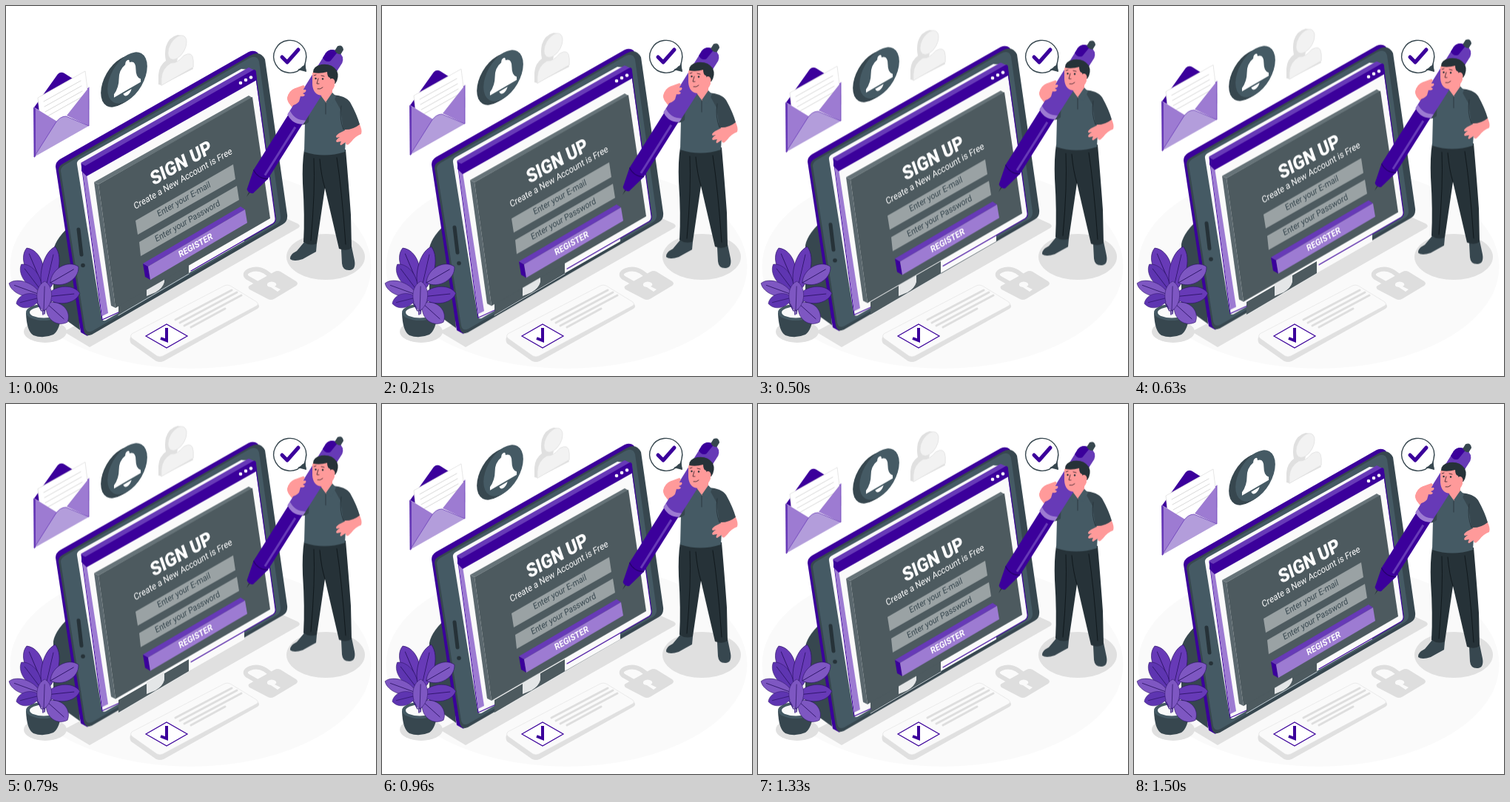
An HTML page that plays this animation: 500x500 px, repeating every 1540 ms.

```html
<!DOCTYPE html>
<html lang="en">
<head>
<meta charset="utf-8">
<title>Sign up</title>
<style>
html, body { margin: 0; width: 100%; height: 100%; overflow: hidden; background: #fff; }
svg { display: block; width: 100vw; height: 100vh; }
.float { animation: float 1540ms linear infinite; }
@keyframes float {
  0%, 97.4%, 100% { transform: translateY(0); }
  48.7% { transform: translateY(-10px); }
}
text { font-family: Roboto, sans-serif; }
.p1 { fill: #3b009b; } .p2 { fill: #673ab7; } .p3 { fill: #9d7bd2; } .p4 { fill: #b39ddb; }
.s1 { fill: #263238; } .s2 { fill: #37474f; } .s3 { fill: #455a64; } .s4 { fill: #4d5a5f; }
.w { fill: #fafafa; } .g2 { fill: #e0e0e0; } .skin { fill: #ff9a9a; }
.line { fill: none; stroke-linecap: round; stroke-linejoin: round; }
</style>
</head>
<body>
<svg viewBox="0 0 500 500">
  <defs>
    <path id="leaf" d="M0 0C-16-10-17-38 0-46C17-38 16-10 0 0Z"/>
    <path id="vein" class="line" d="M0 0V-38" stroke="#2c1466" stroke-width=".9"/>
    <circle id="disc" r="31" transform="matrix(.866 -.5 0 1 0 0)"/>
  </defs>

  <!-- floor and shadows -->
  <ellipse class="w" cx="249.500" cy="352" rx="244" ry="138"/>
  <ellipse class="g2" cx="432" cy="339" rx="53" ry="31"/>
  <path class="g2" d="M78 440L113 461L395 300Q399 297 394 294L372 284Z"/>
  <ellipse class="g2" cx="53" cy="440" rx="29" ry="15"/>

  <!-- padlock -->
  <path class="line" d="M342 376L326 367Q320 361 330 357Q340 353 350 359L361 367" stroke="#dedede" stroke-width="6"/>
  <path fill="#dedede" d="M329 378L363 359Q367 357 371 359L392 372Q396 375 392 378L362 396Q358 398 354 396L329 383Q326 380 329 378Z"/>
  <path class="w" d="M354 374Q359 371 364 374Q367 377 363 379L371 383L367 386L358 380Q350 379 354 374Z"/>

  <!-- paper card -->
  <path class="g2" d="M169 446L295 379Q299 377 303 379L340 402Q344 406 340 409L213 480Q208 482 203 480L169 456Q166 451 169 446Z"/>
  <path class="w" stroke="#e0e0e0" stroke-width=".6" d="M170 443L295 378Q299 376 303 378L339 400Q342 403 339 405L212 473Q208 475 204 473L170 449Q167 446 170 443Z"/>
  <path class="line" d="M229 424L305 384M235 428L312 387M241 432L318 391M250 434L296 409" stroke="#dedede" stroke-width="3"/>
  <path fill="#fff" stroke="#3b009b" stroke-width="1.200" d="M189 446L217 430L245 446L217 462Z"/>
  <path d="M209 449L217 452V435" fill="none" stroke="#3b009b" stroke-width="4"/>

  <!-- envelope -->
  <g class="float">
    <path class="p1" d="M38 137L70 92Q74 88 79 91L112 112L75 158Z"/>
    <path fill="#fff" stroke="#e0e0e0" stroke-width=".8" d="M43 124L107 88L112 128L112 140L75 162L46 150Z"/>
    <path class="line" d="M51 129L101 101M52 136L102 108M53 143L103 115M56 149L104 122" stroke="#d5d5d5" stroke-width=".9"/>
    <path class="p3" d="M38 137L69 156L38 204Z"/>
    <path class="p3" d="M112 110V162L82 148Z"/>
    <path class="p4" d="M38 204L67 158Q73 149 81 149L112 162Z"/>
    <path class="line" d="M38 137V204L67 158Q73 149 81 149L112 162V110" stroke="#673ab7" stroke-width=".8"/>
    <path class="p2" d="M37 137L40 139V203L38 205Z"/>
  </g>

  <!-- bell -->
  <g class="float">
    <g class="s2">
      <use href="#disc" x="155" y="102"/><use href="#disc" x="158" y="100.500"/><use href="#disc" x="161" y="99"/>
    </g>
    <use href="#disc" class="s3" x="164" y="97"/>
    <path transform="matrix(.95 -.55 0 1.080 164 97)" fill="#fff" d="M-19 11Q-12 6-12-5Q-12-16-3-18Q-3-22 0-22Q3-22 3-18Q12-16 12-5Q12 6 19 11V15H-19ZM-6 17H6Q4 22 0 22Q-4 22-6 17Z"/>
  </g>

  <!-- contact icon -->
  <g class="float">
    <path class="g2" d="M206 106V93Q207 80 216 74Q214 65 216 55Q220 42 232 39L237 40L231 76L246 66L253 85L210 107Z"/>
    <g transform="matrix(.866 -.5 0 1 231.500 56)" fill="#f2f2f2" stroke="#e0e0e0" stroke-width=".7">
      <path d="M-25 39V30Q-24 16-10 16Q0 22 10 16Q24 16 25 30V39Z"/>
      <circle r="14.500"/>
    </g>
  </g>

  <!-- tablet -->
  <g class="float">
    <path class="s2" d="M92 292Q67 313 64 330V412L100 438Z"/>
    <path class="p1" d="M67 217Q67 211 73 207L328 62Q335 59 340 63L350 80L110 446L101 441Z"/>
    <path class="s2" d="M71 222Q71 216 77 213L330 67Q343 59 350 72L380 282Q381 291 374 295L116 444Q107 448 105 438Z"/>
    <path class="s3" d="M74 223Q74 218 79 215L328 71Q339 65 342 75L371 284Q372 291 366 295L117 439Q109 443 107 435Z"/>
    <path class="line" d="M98 302L102 336" stroke="#263238" stroke-width="5"/>
    <circle class="s1" cx="104" cy="350.500" r="2.800"/>
    <path class="w" d="M96 214Q95 210 100 207L318 85L336 87L364 286Q365 291 361 294L136 424Q130 428 129 420Z"/>
  </g>

  <!-- strips that stay put while the window floats -->
  <path class="w" d="M247 346L322 303V318L247 361Z"/>
  <path class="s4" d="M152 400L247 345V361L152 417Z"/>
  <path fill="#e4e6e7" d="M190 376L214 362V373Q212 381 202 387L190 392Z"/>
  <path class="line" d="M152 418L247 362" stroke="#e4e6e7" stroke-width=".8"/>

  <!-- window -->
  <g class="float">
    <path class="line" stroke="#3b009b" stroke-width="1.200" d="M250 358L361 294Q365 291 364 286L337 90M102 213L130 424L152 414"/>
    <path class="p3" d="M102 213L109 227L138 415L130 419Z"/>
    <path class="p2" d="M101 212L328 83L336 87L107 217Z"/>
    <path class="p1" d="M107 216L335 86Q338 86 338 90L339 100L109 230L102 223V213Z"/>
    <g fill="#fff">
      <circle cx="317" cy="104" r="2.300"/><circle cx="324" cy="100" r="2.300"/><circle cx="331" cy="96.500" r="2.300"/>
    </g>

    <!-- form -->
    <path fill="#667378" d="M119 238L328 121L333 124L125 241Z"/>
    <path fill="#5b686e" d="M119 238L125 241L148 408L142 405Z"/>
    <path class="s4" d="M125 241L333 123L357 287L148 408Z"/>
    <path fill="#9aa2a4" d="M175 290L307 214L310 234L178 309ZM180 319L312 243L315 262L182 338Z"/>
    <path class="p1" d="M185 348L192 352L195 370L188 366Z"/>
    <path class="p2" d="M185 348L317 271L323 275L192 352Z"/>
    <path class="p3" d="M192 352L323 275L326 293L195 370Z"/>
    <g fill="#fff">
      <text transform="matrix(.87 -.49 .35 1 199 243)" font-size="24" font-weight="800">SIGN UP</text>
      <text transform="matrix(.87 -.5 .35 1 174.500 275)" font-size="11.600">Create a New Account is Free</text>
      <text transform="matrix(.87 -.5 .35 1 235 340)" font-size="11.200" font-weight="700">REGISTER</text>
    </g>
    <g class="s2">
      <text transform="matrix(.87 -.5 .35 1 206 285)" font-size="10.900">Enter your E-mail</text>
      <text transform="matrix(.87 -.5 .35 1 203 319)" font-size="10.900">Enter your Password</text>
    </g>
  </g>

  <!-- plant -->
  <path class="s2" d="M27 415Q28 440 37 445Q50 450 64 444Q73 438 75 415Z"/>
  <ellipse class="s3" cx="51" cy="414" rx="24" ry="11"/>
  <ellipse class="w" cx="51" cy="414" rx="19" ry="7.500"/>
  <path class="line" d="M50 417Q50 390 47 362M52 416Q54 385 64 360M48 412Q38 392 27 380M52 412Q60 398 72 390" stroke="#3b1a86" stroke-width="1.500"/>
  <g id="leaves"></g>

  <!-- man with pen -->
  <g class="float">
    <path class="s2" d="M384 342Q383 336 393 331L403 319L420 321L419 332Q408 338 401 342Q389 346 384 342ZM453 329L467 325L471 344Q473 356 465 357Q455 358 454 348Z"/>
    <path class="s1" d="M403 194H459Q463 240 466 282L467 327Q460 332 450 328L431 246L420 321Q411 325 402 319Q404 285 401 240Q400 212 403 194Z"/>
    <path class="line" d="M424 207Q426 230 431 246M416 206Q418 250 412 317M447 205Q454 250 459 322" stroke="#11191d" stroke-width="1"/>
    <path class="skin" d="M423 110H441V129Q432 138 423 128Z"/>
    <path class="s3" d="M422 123Q411 127 406 138L404 157L403 197Q430 206 458 197L460 162L456 125L441 120L433 131Z"/>
    <path class="skin" d="M457 162L477 158Q482 168 480 173Q472 176 467 183L463 187Q459 189 459 184L453 188Q450 188 453 183L447 184Q444 182 451 177L447 178Q444 176 450 172L458 168Z"/>
    <path class="s2" d="M441 120Q459 121 465 130Q474 146 478 160Q468 168 456 167L452 140Z"/>
    <path class="s3" d="M424 119L432 130L427 135L419 124ZM441 117L432 130L440 135L446 122Z"/>
    <path class="line" d="M432 131V146M453 135Q450 152 456 167" stroke="#263238" stroke-width=".8"/>
    <path class="skin" d="M380 125Q382 114 391 111L402 114L403 134L392 141Q384 137 380 125Z"/>
    <path class="s2" d="M392 139Q402 132 410 135L409 157Q400 164 395 157Z"/>

    <g transform="translate(325 258) rotate(32.200)">
      <path class="s1" d="M-1-10L0 0L1-10Z"/>
      <path class="p1" d="M-5-9L-11.500-36V-127H11.500V-36L5-9Q0-5-5-9Z"/>
      <path class="p2" d="M4-38H7V-115H4Z"/>
      <path d="M-11.500-36Q0-29 11.500-36" fill="none" stroke="#26006c" stroke-width="1.200"/>
      <path class="p2" d="M-12.500-124Q0-116 12.500-124L13-222Q11-232 0-232Q-11-232-13-222Z"/>
      <path class="p3" d="M-12.500-124Q0-116 12.500-124V-130Q0-122-12.500-130Z"/>
      <path class="p1" d="M-13-214V-222Q-11-232 0-232L-2-216Q-6-210-13-214Z"/>
      <path class="s2" d="M-4.500-231V-238Q0-244 5-238V-231Q0-228-4.500-231Z"/>
    </g>

    <path class="skin" d="M380 124Q382 115 391 111L402 107Q406 109 401 113L405 113Q407 116 401 118L404 120Q403 123 398 122L396 129Q391 135 385 134Q380 130 380 124Z"/>
    <path class="skin" d="M414 91Q417 84 425 83L443 90L444 108Q439 121 427 121Q415 120 414 106Z"/>
    <path class="s1" d="M415 90Q414 82 426 79Q440 77 447 87Q451 96 445 105L439 104L438 97Q434 96 434 89Q424 92 415 90Z"/>
    <ellipse class="skin" cx="440.500" cy="103" rx="4" ry="5"/>
    <g class="s1"><circle cx="418.500" cy="98" r="1.200"/><circle cx="428" cy="98.500" r="1.200"/></g>
    <path class="line" d="M416 94L419 93M426 94L430 95M422 98L420 105H423M421 112Q425 113 428 110" stroke="#4a2d35" stroke-width=".9"/>
  </g>

  <!-- speech bubble -->
  <path fill="#fff" stroke="#37474f" stroke-width="1.400" d="M401 82A22 22 0 1 1 405 74Q403 81 405 88Z"/>
  <path class="s2" d="M394 86Q402 83 404 77L406 89Z"/>
  <path class="line" d="M373 69L380 76L395 59" stroke="#3b009b" stroke-width="5"/>
</svg>
<script>
// x, y, angle, length scale, width scale, fill
const leaves = [
  [47, 372, -23, 1.06, .95, "#673ab7"], [52, 388, 13, 1.4, .9, "#673ab7"],
  [60, 374, 60, .95, .95, "#7e57c2"], [47, 384, -37, .95, .8, "#5e35b1"],
  [46, 390, -70, .97, .75, "#7e57c2"], [54, 393, 84, 1, .9, "#673ab7"],
  [46, 394, -104, .72, .75, "#5e35b1"], [55, 402, 132, .82, 1, "#7e57c2"],
  [51, 412, 2, .87, .8, "#7e57c2"]
];
document.getElementById("leaves").innerHTML = leaves.map(([x, y, a, l, w, c]) =>
  `<g transform="translate(${x} ${y}) rotate(${a}) scale(${w} ${l})">
    <use href="#leaf" fill="${c}" stroke="#2c1466" stroke-width=".6"/><use href="#vein"/></g>`).join("");
</script>
</body>
</html>
```
